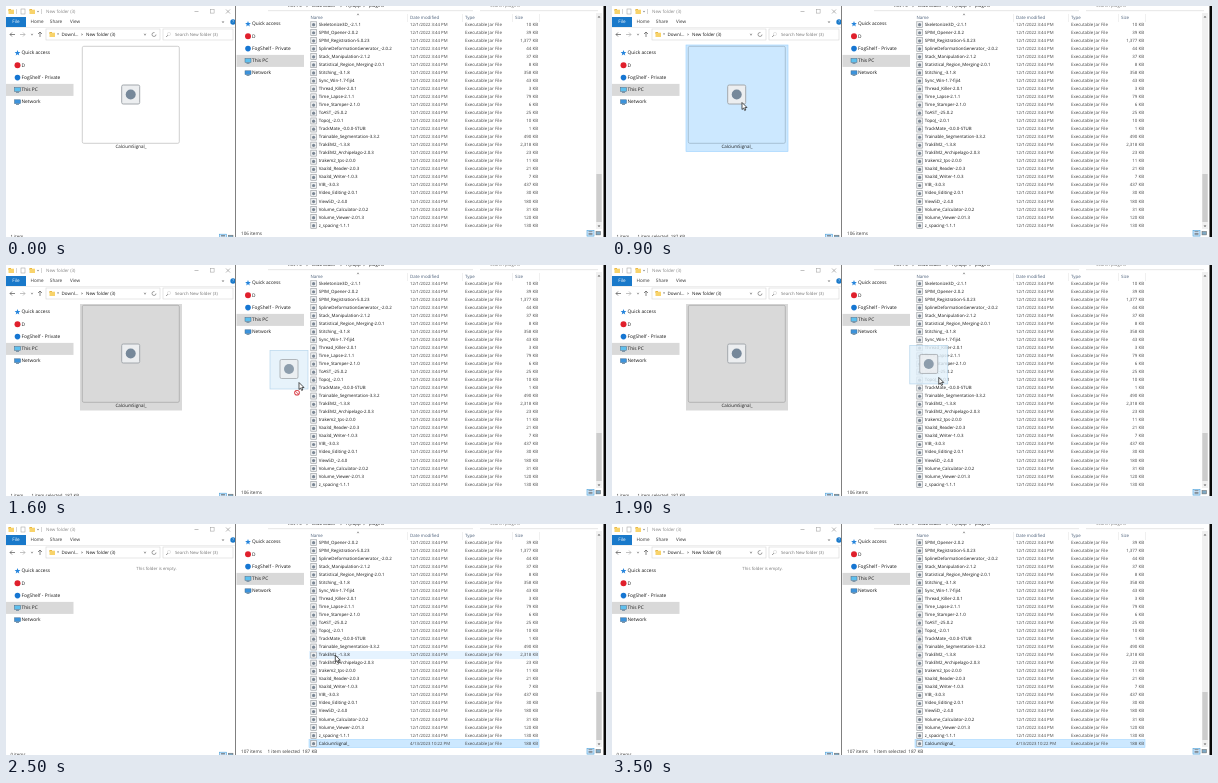
Recreate the animation shown at these times as an HTML page with a canvas. Size 600 by 231 pixels, loop 3.8 s.

```html
<!DOCTYPE html>
<html lang="en">
<head>
<meta charset="utf-8">
<title>Installing a plugin by drag and drop</title>
<style>
html, body { margin: 0; width: 100%; height: 100%; overflow: hidden; background: #fff; }
canvas { display: block; width: 600px; height: 231px; }
</style>
</head>
<body>
<canvas width="600" height="231"></canvas>
<script>
const ctx = document.querySelector('canvas').getContext('2d');
const LOOP = 3800, STEP = 100, LAST = 3500;
const SELECT = 700, DRAG = 1100, BLUR = 1300, DROP = 2000, ADDED = 2500;
const ROW = 8.04, TOP = 18.5;
const INK = '#161616', SOFT = '#444', DIM = '#777';
const HOVER = '#e5f3ff', PICKED = '#cce8ff', EDGE = '#99d1ff';

const files = `Skeletonize3D_-2.1.1|10
SPIM_Opener-2.0.2|39
SPIM_Registration-5.0.23|1,377
SplineDeformationGenerator_-2.0.2|44
Stack_Manipulation-2.1.2|37
Statistical_Region_Merging-2.0.1|8
Stitching_-3.1.8|358
Sync_Win-1.7-fiji4|43
Thread_Killer-2.0.1|3
Time_Lapse-2.1.1|79
Time_Stamper-2.1.0|6
ToAST_-25.0.2|25
TopoJ_-2.0.1|10
TrackMate_-0.0.0-STUB|1
Trainable_Segmentation-3.3.2|490
TrakEM2_-1.3.8|2,318
TrakEM2_Archipelago-2.0.3|23
trakem2_tps-2.0.0|11
Vaa3d_Reader-2.0.3|21
Vaa3d_Writer-1.0.3|7
VIB_-3.0.3|437
Video_Editing-2.0.1|30
View5D_-2.4.0|180
Volume_Calculator-2.0.2|31
Volume_Viewer-2.01.3|120
z_spacing-1.1.1|130`.split('\n').map(line => line.split('|'));
const added = ['CalciumSignal_', '188'];

// Pointer path: time, x, y
const path = [
  [100, 192, 226], [400, 161.5, 129.5], [700, 130, 96.5], [1100, 130, 96.5],
  [1300, 180, 106], [1600, 293, 117.5], [2000, 333, 111.5], [2300, 333, 111.5],
  [2800, 322.5, 167.5], [3200, 306, 236]
];

function pointer(t) {
  const i = path.findIndex(p => p[0] > t);
  if (i < 1) return null;
  const [t0, x0, y0] = path[i - 1], [t1, x1, y1] = path[i];
  let k = (t - t0) / (t1 - t0);
  k = k * k * (3 - 2 * k);
  return { x: x0 + (x1 - x0) * k, y: y0 + (y1 - y0) * k };
}

function box(x, y, w, h, fill, stroke, line = 0.6) {
  if (fill) { ctx.fillStyle = fill; ctx.fillRect(x, y, w, h); }
  if (stroke) { ctx.strokeStyle = stroke; ctx.lineWidth = line; ctx.strokeRect(x, y, w, h); }
}

function dot(x, y, r, fill) {
  ctx.fillStyle = fill;
  ctx.beginPath();
  ctx.arc(x, y, r, 0, 7);
  ctx.fill();
}

function poly(points, stroke, fill, line = 0.7) {
  ctx.beginPath();
  points.forEach(([x, y]) => ctx.lineTo(x, y));
  if (fill) { ctx.closePath(); ctx.fillStyle = fill; ctx.fill(); }
  if (stroke) { ctx.strokeStyle = stroke; ctx.lineWidth = line; ctx.stroke(); }
}

// Text is set large and scaled down so that small advances stay linear.
function text(s, x, y, color = INK, size = 4.4, align = 'left') {
  ctx.save();
  ctx.translate(x, y);
  ctx.scale(size / 20, size / 20);
  ctx.font = '20px "Open Sans", "Noto Sans", sans-serif';
  ctx.textRendering = 'geometricPrecision';
  ctx.textBaseline = 'middle';
  ctx.textAlign = align;
  ctx.fillStyle = color;
  ctx.fillText(s, 0, 0);
  ctx.restore();
}

function folder(x, y) {
  box(x - 2.5, y - 2.5, 2.5, 2, '#e0ac35');
  box(x - 2.5, y - 1.8, 5.5, 4.3, '#f8d36b');
}

function chevron(x, y, dx, dy, color = DIM) {
  poly([[x - dx - dy, y - dy - dx], [x + dx, y + dy], [x - dx + dy, y - dy + dx]], color);
}

function monitor(x, y, screen) {
  box(x - 3, y - 2.4, 6, 3.8, screen, '#456b88', 0.5);
  box(x - 1.5, y + 2, 3, 0.7, '#456b88');
}

function star(x, y) {
  const tips = Array.from({ length: 10 }, (_, i) => {
    const r = i % 2 ? 1.3 : 3, a = i * Math.PI / 5;
    return [x + r * Math.sin(a), y - r * Math.cos(a)];
  });
  poly(tips, null, '#2685dc');
}

function sidebar(x, y) {
  const gap = 12.3;
  box(x, y + 3 * gap - 6, 67.5, 12, '#d9d9d9');
  star(x + 11.5, y);
  dot(x + 11.5, y + gap, 3, '#e0202c');
  dot(x + 11.5, y + 2 * gap, 2.8, '#1676d2');
  monitor(x + 11.5, y + 3 * gap, '#5fc0ee');
  monitor(x + 11.5, y + 4 * gap, '#3c93dc');
  ['Quick access', 'D', 'FogShelf - Private', 'This PC', 'Network']
    .forEach((s, i) => text(s, x + 15.5, y + i * gap, INK, 4.8));
}

function viewButtons(x, y) {
  box(x - 3.5, y - 2.8, 7, 5.6, PICKED, '#4a9fd8', 0.6);
  [-1.5, 0, 1.5].forEach(dy => box(x - 2, y + dy - 0.3, 4, 0.6, '#555'));
  box(x + 5.5, y - 1.8, 4.5, 3.4, '#7fa9c4', '#666', 0.5);
}

function jarIcon(x, y) {
  ctx.beginPath();
  ctx.roundRect(x - 9, y - 9.5, 18, 19, 1.5);
  ctx.fillStyle = '#eceef0';
  ctx.fill();
  ctx.strokeStyle = '#a3a8ad';
  ctx.lineWidth = 1;
  ctx.stroke();
  dot(x, y, 5, '#76889a');
}

function tile(t, hover) {
  const picked = t >= SELECT, blurred = t >= BLUR;
  if (blurred) box(74, 39, 102, 106.5, '#d9d9d9');
  else if (picked) box(74, 39, 102, 106.5, PICKED, EDGE);
  else if (hover) box(74, 39, 102, 106.5, HOVER);
  ctx.beginPath();
  ctx.roundRect(76.3, 40.3, 97, 97, 1.5);
  ctx.strokeStyle = blurred ? '#aaa' : picked ? '#9fb8c9' : hover ? '#b4cbdc' : '#c4c4c4';
  ctx.lineWidth = 0.8;
  ctx.stroke();
  jarIcon(124.7, 88.5);
  text(added[0], 125, 141, INK, 4.5, 'center');
}

function leftWindow(t, p) {
  box(0, 0, 229, 231, '#fff');
  folder(5, 5.5);
  box(10.5, 3, 0.5, 5, '#aaa');
  box(15, 3, 4, 5, '#fff', '#999', 0.5);
  folder(26, 5.5);
  chevron(32, 5.5, 0, 0.6);
  box(35.5, 3, 0.5, 5, '#aaa');
  text('New folder (3)', 40, 5.5, '#888', 4.5);
  box(188.5, 5.3, 4, 0.6, '#999');
  box(204.5, 3.5, 3.6, 3.6, null, '#999', 0.5);
  poly([[220, 3.5], [224, 7.5]], '#999');
  poly([[224, 3.5], [220, 7.5]], '#999');

  box(0, 11, 20, 10, '#1979ca');
  text('File', 10, 16, '#fff', 4.6, 'center');
  [['Home', 31], ['Share', 50], ['View', 69]]
    .forEach(([s, x]) => text(s, x, 16, '#333', 4.6, 'center'));
  chevron(217, 16, 0, 0.8);
  dot(227, 16, 2.7, '#1979ca');
  text('?', 227, 16, '#fff', 4, 'center');
  box(0, 21, 229, 0.5, '#dcdcdc');

  poly([[4, 28.5], [9, 28.5]], '#555');
  poly([[6, 26.5], [4, 28.5], [6, 30.5]], '#555');
  poly([[14, 28.5], [19, 28.5]], '#aaa');
  poly([[17, 26.5], [19, 28.5], [17, 30.5]], '#aaa');
  chevron(26, 28.5, 0, 0.7);
  poly([[34, 31], [34, 26]], '#555');
  poly([[32, 28], [34, 26], [36, 28]], '#555');
  box(40, 23, 114, 11, '#fff', '#d5d5d5');
  folder(46, 28.5);
  text('«', 51, 28.2, '#555');
  text('Downl...', 55.5, 28.5, INK, 4.5);
  chevron(76, 28.5, 0.7, 0);
  text('New folder (3)', 80, 28.5, INK, 4.5);
  chevron(139, 28.5, 0, 0.8);
  ctx.beginPath();
  ctx.arc(148, 28.5, 2, 0, 5);
  ctx.strokeStyle = '#666';
  ctx.lineWidth = 0.6;
  ctx.stroke();
  box(157, 23, 70, 11, '#fff', '#d5d5d5');
  ctx.beginPath();
  ctx.arc(163, 28, 1.6, 0, 7);
  ctx.stroke();
  poly([[161.8, 29.2], [160.2, 31]], '#666');
  text('Search New folder (3)', 169, 28.5, DIM, 4.3);

  sidebar(0, 47);
  if (t < DROP) tile(t, p && p.x > 74 && p.x < 176 && p.y > 39 && p.y < 146);
  else text('This folder is empty.', 150.5, 45.3, DIM, 4.3, 'center');
  text(t < DROP ? '1 item' : '0 items', 4.5, 230.5, '#333');
  if (t >= SELECT && t < DROP) text('1 item selected  187 KB', 25.5, 230.5, '#333');
  viewButtons(217, 231);
}

function fileRow([name, size], y, date = '12/1/2022 3:44 PM') {
  box(304.8, y - 3, 5.6, 6, '#f1f2f3', '#92979c', 0.6);
  dot(307.6, y + 0.2, 1.6, '#7b8794');
  text(name, 312.8, y);
  text(date, 404, y, SOFT, 4.3);
  text('Executable Jar File', 459, y, SOFT);
  text(size + ' KB', 532, y, SOFT, 4.4, 'right');
}

function rightWindow(t, p) {
  box(229, 0, 371, 231, '#fff');
  box(229, 0, 1, 231, '#808080');

  text('This PC', 281, -0.5);
  text('Downloads', 306, -0.5);
  text('Fiji.app', 340, -0.5);
  text('plugins', 363, -0.5);
  [301, 335, 358].forEach(x => chevron(x, 0, 0.7, 0));
  text('Search plugins', 484, -0.5, DIM);
  box(262, 4.5, 205, 0.6, '#d5d5d5');
  box(474, 4.5, 118, 0.6, '#d5d5d5');

  sidebar(230.5, 18);

  const isAdded = t >= ADDED, list = isAdded ? [...files.slice(1), added] : files;
  const last = list.length - 1;
  list.forEach((file, i) => {
    const y = TOP + i * ROW, top = y - ROW / 2;
    const hover = p && t >= DROP && p.x > 303 && Math.floor((p.y + 4 - TOP) / ROW) === i;
    if (isAdded && i === last) box(303, top, 230, ROW, PICKED, EDGE, 0.5);
    else if (hover) box(303, top, 230, ROW, HOVER);
    if (t >= DROP && !isAdded && i === last) box(303.5, top, 230, ROW, null, EDGE, 0.6);
    fileRow(file, y, isAdded && i === last ? '4/13/2023 10:22 PM' : undefined);
  });

  box(300, 7, 290, 8.2, '#fff');
  [['Name', 304.5], ['Date modified', 404], ['Type', 459], ['Size', 509]]
    .forEach(([s, x]) => text(s, x, 12, '#4c607a'));
  [401.5, 456.5, 506.5, 533.5].forEach(x => box(x, 8, 0.5, 8, '#e0e0e0'));
  chevron(352, 8.5, 0, -0.7);

  box(590, 7, 6, 216, '#f0f0f0');
  box(590.3, 168, 5.4, 48, '#cdcdcd');
  chevron(593, 11, 0, -0.8, '#555');
  chevron(593, 220, 0, 0.8, '#555');

  text(isAdded ? '107 items' : '106 items', 235, 227.7, '#333', 4.6);
  if (isAdded) text('1 item selected  187 KB', 261.5, 227.7, '#333', 4.6);
  viewButtons(584.5, 227.3);
  box(597.5, 0, 2.5, 231, '#080808');
}

function dragImage({ x, y }) {
  ctx.globalAlpha = 0.8;
  box(x - 29, y - 32, 38, 38.5, '#e2f0fb', '#a8cde8', 0.7);
  jarIcon(x - 10, y - 13.5);
  ctx.globalAlpha = 1;
  if (x < 230 || x > 300) return;
  dot(x - 2, y + 10.2, 2.8, '#d6303a');
  dot(x - 2, y + 10.2, 1.9, '#fff');
  poly([[x - 3.6, y + 8.6], [x - 0.4, y + 11.8]], '#d6303a', null, 0.9);
}

function arrow({ x, y }) {
  const shape = [[0, 0], [0, 7], [1.6, 5.5], [2.7, 8], [3.8, 7.5], [2.8, 5.1], [5, 5], [0, 0]];
  poly(shape.map(([a, b]) => [x + a, y + b]), '#111', '#fff', 0.7);
}

function draw(now) {
  const t = Math.min(LAST, Math.floor(now % LOOP / STEP) * STEP);
  const p = pointer(t);
  leftWindow(t, p);
  rightWindow(t, p);
  if (p && t > DRAG && t < DROP) dragImage(p);
  if (p) arrow(p);
}

let start;
function tick(now) {
  start ??= now;
  draw(now - start);
  requestAnimationFrame(tick);
}
draw(0);
requestAnimationFrame(tick);
</script>
</body>
</html>
```
